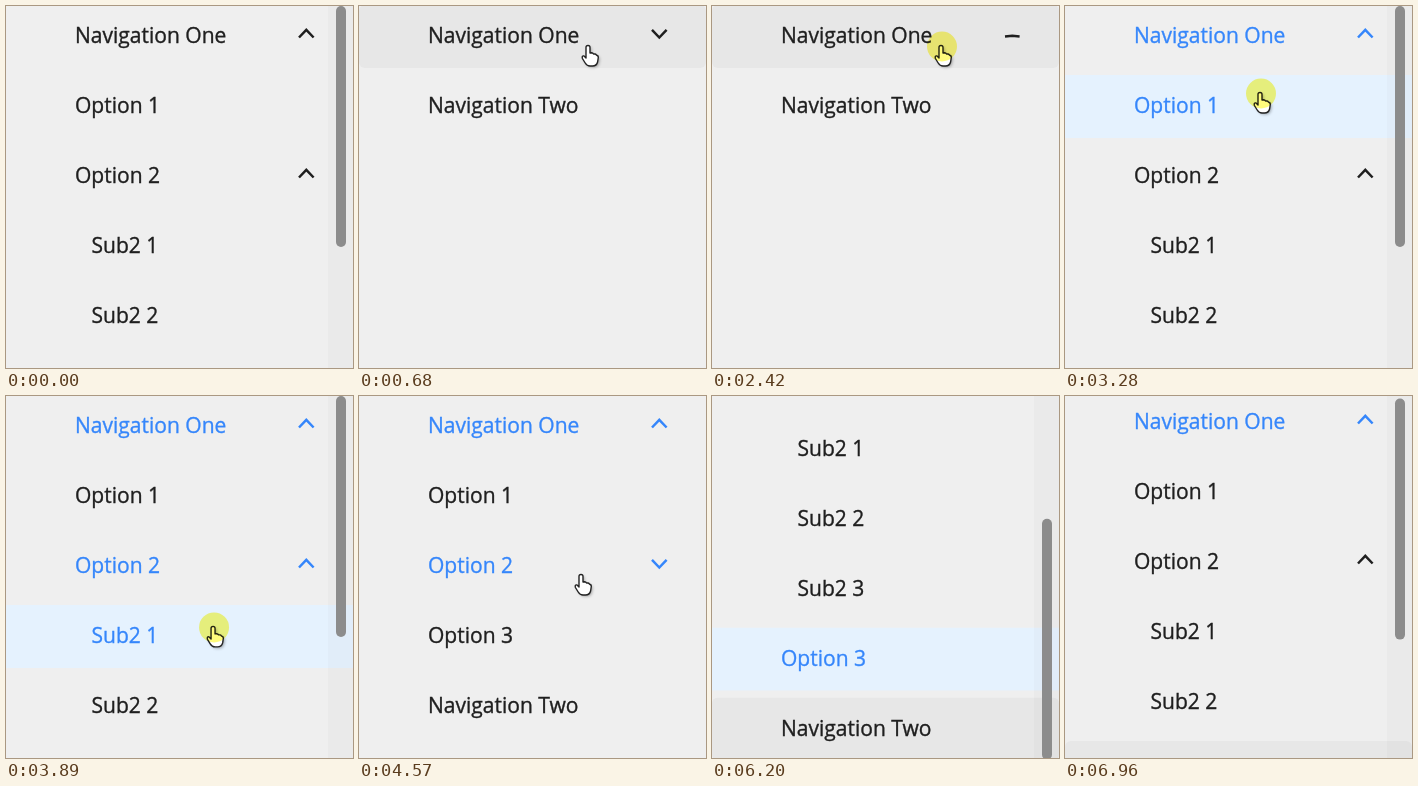
Animation of 347x362 px, one loop 7280 ms. Source, as an HTML page with a canvas:

```html
<!DOCTYPE html>
<html lang="en">
<head>
<meta charset="utf-8">
<title>Navigation menu</title>
<style>
html, body { margin: 0; width: 100%; height: 100%; overflow: hidden; background: #efefef; }
canvas { display: block; }
</style>
</head>
<body>
<canvas id="stage" width="347" height="362"></canvas>
<script>
const W = 347, H = 362, LOOP = 7280, PITCH = 70, MAX_SCROLL = 188;
const INK = '#1f1f1f', BLUE = '#3586fb';
const ctx = document.getElementById('stage').getContext('2d');

// Clicks that close and reopen each group, starting open.
const navToggles = [400, 930, 2340, 2760];
const optionToggles = [1300, 1740, 4330, 4740];
const selections = [[3200, 'Option 1'], [3720, 'Sub2 1'], [5560, 'Option 3']];
const clicks = [...navToggles, ...optionToggles, ...selections.map(s => s[0])];

// [time, x, y] of the fingertip.
const cursorPath = [
  [70, 225, -30], [330, 229, 40], [980, 229, 40], [1240, 268, 170],
  [1820, 268, 170], [2220, 229, 40], [2820, 229, 40], [3130, 195, 87],
  [3340, 195, 87], [3640, 205, 238], [3800, 205, 238], [4220, 222, 179],
  [4820, 222, 179], [5080, 200, 190], [5335, 200, 192], [5410, 199, 262],
  [5850, 199, 264], [6220, 200, 380], [7280, 200, 385]
];
const scrollPath = [[4950, 0], [5290, MAX_SCROLL], [6180, MAX_SCROLL], [6860, 4], [7280, 4]];

const clamp = v => Math.max(0, Math.min(1, v));
const smooth = v => v * v * (3 - 2 * v);

function along(path, t) {
  if (t <= path[0][0]) return path[0].slice(1);
  const i = path.findIndex(p => p[0] >= t);
  const a = path[i - 1], b = path[i];
  const k = smooth((t - a[0]) / (b[0] - a[0]));
  return a.slice(1).map((v, j) => v + (b[j + 1] - v) * k);
}

function openness(toggles, t, duration) {
  return toggles.reduce((open, at, i) => {
    const k = clamp((t - at) / duration);
    return i % 2 ? open + (1 - open) * k : open * (1 - k);
  }, 1);
}

function layout(t) {
  const nav = openness(navToggles, t, 75), option = openness(optionToggles, t, 75);
  const subHeight = 3 * PITCH * option;
  const navHeight = (3 * PITCH + subHeight) * nav;
  const scroll = along(scrollPath, t)[0];
  const navEnd = PITCH + navHeight, subEnd = Math.min(navEnd, 3 * PITCH + subHeight);
  const row = (label, y, end = Infinity, x = 69, toggles = null) =>
    ({ label, y: y - scroll, end: end - scroll, x, toggles });
  const rows = [
    row('Navigation One', 0, Infinity, 69, navToggles),
    row('Option 1', PITCH, navEnd),
    row('Option 2', 2 * PITCH, navEnd, 69, optionToggles),
    ...[1, 2, 3].map(n => row('Sub2 ' + n, (2 + n) * PITCH, subEnd, 85.5)),
    row('Option 3', 3 * PITCH + subHeight, navEnd),
    row('Navigation Two', navEnd)
  ].filter(r => r.end > r.y);
  return { rows, scroll, overflow: navEnd + 61 > H };
}

function hoveredLabel(t) {
  const y = along(cursorPath, t)[1];
  if (y < 0) return null;
  const hit = layout(t).rows.find(r => y >= r.y - 1 && y < Math.min(r.y + 61, r.end));
  return hit && hit.label;
}

function fillRound(x, y, w, h, r, color) {
  ctx.fillStyle = color;
  ctx.beginPath();
  ctx.roundRect(x, y, w, h, r);
  ctx.fill();
}

function drawLabel(text, x, y, color) {
  ctx.fillStyle = ctx.strokeStyle = color;
  ctx.lineWidth = 0.35;
  ctx.fillText(text, x, y);
  ctx.strokeText(text, x, y);
}

function drawChevron(y, toggles, t, color) {
  const bend = 2 * openness(toggles, t, 180) - 1;
  const mid = y + 27.7 + 2.6 * (1 - Math.abs(bend));
  ctx.strokeStyle = color;
  ctx.lineWidth = 2.5;
  ctx.beginPath();
  ctx.moveTo(293, mid + 3.8 * bend);
  ctx.lineTo(300.3, mid - 3.8 * bend);
  ctx.lineTo(307.6, mid + 3.8 * bend);
  ctx.stroke();
}

function drawRow(row, t, selected, hovered) {
  const isSelected = row.label === selected;
  const isParent = selected && (row.label === 'Navigation One' ||
    row.label === 'Option 2' && selected.startsWith('Sub2'));
  const color = isSelected || isParent ? BLUE : INK;
  ctx.save();
  ctx.beginPath();
  ctx.rect(0, row.y - 1, W, Math.min(PITCH, row.end - row.y));
  ctx.clip();
  if (isSelected) fillRound(0, row.y - 1, W, 63, 0, '#e5f2fe');
  else if (row.label === hovered && !isParent) fillRound(0, row.y - 1, W, 63, 6, '#e7e7e7');
  drawLabel(row.label, row.x, row.y + 37, color);
  if (row.toggles) drawChevron(row.y, row.toggles, t, color);
  ctx.restore();
}

const hand = new Path2D('M-2 12V1.5Q-2-.5 0-.5Q2-.5 2 1.5V7L3.5 6.8Q5 7 5.5 8L7 8' +
  'Q8 8.3 8.5 9.2Q10.3 9.2 10.3 11.5L9.6 16Q8.6 20 4.5 20H2Q-1 20-2.8 17L-5.6 12.5' +
  'Q-6.4 9.5-4 10Z');

function drawCursor(t) {
  const [x, y] = along(cursorPath, t);
  ctx.save();
  ctx.translate(x, y);
  ctx.lineWidth = 1.4;
  ctx.lineJoin = 'round';
  ctx.strokeStyle = '#222';
  ctx.save();
  ctx.shadowColor = 'rgba(0, 0, 0, 0.3)';
  ctx.shadowBlur = 3;
  ctx.shadowOffsetX = ctx.shadowOffsetY = 1.5;
  ctx.fillStyle = '#fff';
  ctx.fill(hand);
  ctx.restore();
  ctx.stroke(hand);
  // The click marker tints whatever lies under it, the hand included.
  if (clicks.some(at => t >= at - 30 && t < at + 190)) {
    ctx.globalCompositeOperation = 'multiply';
    ctx.fillStyle = '#fffb7c';
    ctx.beginPath();
    ctx.arc(1, 0.5, 15, 0, 2 * Math.PI);
    ctx.fill();
  }
  ctx.restore();
}

function draw(t) {
  const { rows, scroll, overflow } = layout(t);
  const selected = selections.filter(s => s[0] <= t).map(s => s[1]).pop();
  const hovered = hoveredLabel(Math.max(0, t - 80));
  ctx.fillStyle = '#efefef';
  ctx.fillRect(0, 0, W, H);
  ctx.font = '21px "Open Sans", "Noto Sans", sans-serif';
  rows.forEach(row => drawRow(row, t, selected, hovered));
  if (overflow) {
    ctx.fillStyle = 'rgba(0, 0, 0, 0.02)';
    ctx.fillRect(322, 0, 25, H);
    fillRound(330, scroll * 123 / MAX_SCROLL, 10, 241, 5, '#8c8c8c');
  }
  drawCursor(t);
}

const start = performance.now();
function tick() {
  draw((performance.now() - start) % LOOP);
  requestAnimationFrame(tick);
}
tick();
</script>
</body>
</html>
```
